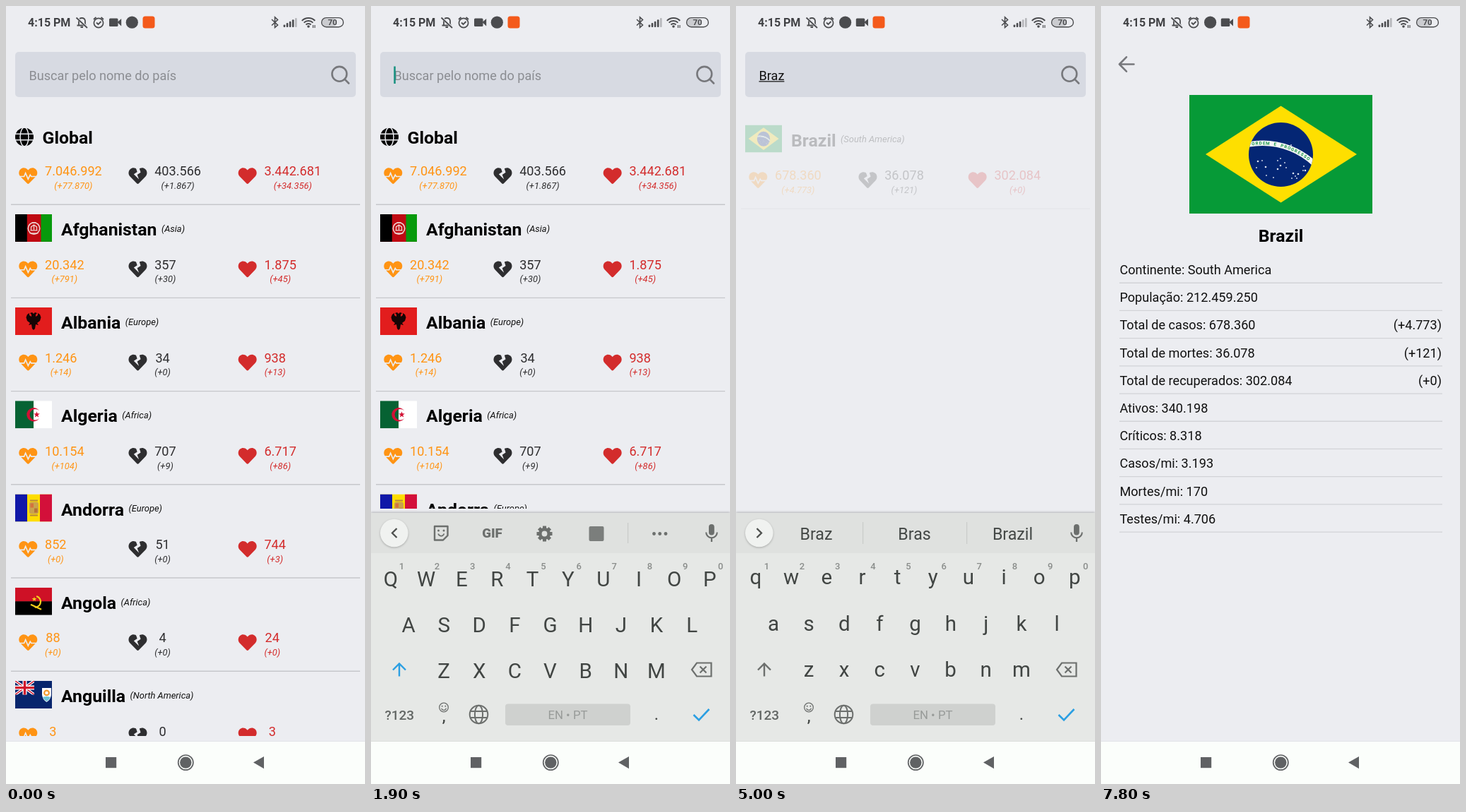
Write an HTML page with a canvas that moves like this. It is 508 px wide and 1102 px high and loops after 10 s.

```html
<!DOCTYPE html>
<html lang="pt">
<head>
<meta charset="utf-8">
<style>
html, body { margin: 0; width: 100%; height: 100%; overflow: hidden; background: #fbfefb; }
canvas { display: block; width: 508px; height: 1102px; }
</style>
</head>
<body>
<canvas id="stage"></canvas>
<script>
const W = 508, H = 1102, LOOP = 10000, NAV = 1042, KB = 718;
const BG = '#ecedf1', PAPER = '#fbfefb', GREY = '#77787c', KEY = '#414543', DIM = '#6c6f6d', BLUE = '#2b9fe2';
const canvas = document.getElementById('stage'), c = canvas.getContext('2d');
const dpr = window.devicePixelRatio || 1;
canvas.width = W * dpr;
canvas.height = H * dpr;

const clamp = v => Math.max(0, Math.min(1, v));
const span = (t, a, b) => clamp((t - a) / (b - a));
// last value whose start time has passed
const step = (t, pairs) => pairs.reduce((v, [at, next]) => t >= at ? next : v, pairs[0][1]);

function rect(x, y, w, h, color, r = 0) {
  c.fillStyle = color;
  c.beginPath();
  c.roundRect(x, y, w, h, r);
  c.fill();
}
function disc(x, y, r, color) {
  c.fillStyle = color;
  c.beginPath();
  c.arc(x, y, r, 0, 7);
  c.fill();
}
function ring(x, y, r, color, w, from = 0, to = 2 * Math.PI) {
  c.strokeStyle = color;
  c.lineWidth = w;
  c.beginPath();
  c.arc(x, y, r, from, to);
  c.stroke();
}
function fill(d, color) {
  c.fillStyle = color;
  c.fill(new Path2D(d));
}
function line(d, color, w) {
  c.strokeStyle = color;
  c.lineWidth = w;
  c.stroke(new Path2D(d));
}
function at(x, y, sx, sy, paint) {
  c.save();
  c.translate(x, y);
  c.scale(sx, sy);
  paint();
  c.restore();
}
function clipped(x, y, w, h, paint) {
  c.save();
  c.beginPath();
  c.rect(x, y, w, h);
  c.clip();
  paint();
  c.restore();
}
function shadow(blur, dy, paint) {
  c.save();
  c.shadowColor = 'rgba(0,0,0,.25)';
  c.shadowBlur = blur * dpr;
  c.shadowOffsetY = dy * dpr;
  paint();
  c.restore();
}
const font = (size, style = '') => { c.font = `${style} ${size}px Roboto, sans-serif`; };
function text(s, x, y, size, color, style = '', align = 'left') {
  font(size, style);
  c.fillStyle = color;
  c.textAlign = align;
  c.fillText(s, x, y);
  return c.measureText(s).width;
}
function star(x, y, r, color) {
  c.fillStyle = color;
  c.beginPath();
  for (let i = 0; i < 10; i++) {
    const a = i * Math.PI / 5 - Math.PI / 2, k = i % 2 ? r * .4 : r;
    c.lineTo(x + k * Math.cos(a), y + k * Math.sin(a));
  }
  c.fill();
}

// Flags are painted in a 52 x 39 box
function stripes([left, mid, right], a, b) {
  rect(0, 0, 52, 39, mid);
  rect(0, 0, a, 39, left);
  rect(b, 0, 52 - b, 39, right);
}
function ensign(shield) {
  rect(0, 0, 52, 39, '#07256d');
  clipped(0, 0, 27, 19.5, () => {
    line('M0 0L27 19.5M27 0L0 19.5', '#fff', 4);
    line('M0 0L27 19.5M27 0L0 19.5', '#cf142b', 1.4);
    line('M13.5 0V20M0 9.7H27', '#fff', 6);
    line('M13.5 0V20M0 9.7H27', '#cf142b', 3.4);
  });
  shield();
}
const SHIELD = 'M38 10H51V20Q50 27 44.5 30Q39 27 38 20z';
const SKY = [[222, 220], [228, 219], [220, 229], [233, 228], [250, 219], [254, 216], [254, 226], [260, 222], [262, 229],
  [250, 231], [234, 240], [244, 243], [272, 237], [275, 241], [270, 244], [279, 238], [286, 233], [287, 227], [289, 233],
  [277, 244], [269, 197]];
// painted in a 259 x 168 box
function brazil() {
  rect(0, 0, 259, 168, '#069a37');
  fill('M23 84L129.5 15.5L237 84L129.5 152.5z', '#fedf00');
  c.save();
  c.beginPath();
  c.arc(129.5, 84.5, 45.5, 0, 7);
  c.clip();
  rect(80, 30, 100, 110, '#042674');
  ring(103.6, 175, 106.8, '#f6f8f6', 7.5);
  SKY.forEach(([x, y], i) => disc(x - 125, y - 126, i % 3 ? .9 : 1.3, '#dfe5f2'));
  c.restore();
  [...'ORDEM E PROGRESSO'].forEach((ch, i) => {
    c.save();
    c.translate(103.6, 175);
    c.rotate(-.125 + i * .0485);
    text(ch, 0, -104.6, 6.2, '#159447', '700', 'center');
    c.restore();
  });
}
const flags = {
  Afghanistan() {
    stripes(['#000', '#bf0a12', '#079a0c'], 16.8, 36.5);
    ring(26.5, 20, 8.2, '#efd9d6', 1.6);
    line('M21.5 23H31.5M22.5 23V18L26.5 15L30.5 18V23M26.5 16V22M20.5 27H32.5M23.5 12H29.5', '#efd9d6', 1.2);
  },
  Albania() {
    rect(0, 0, 52, 39, '#e21d1d');
    for (const side of [1, -1])
      at(26, 0, side, 1, () => fill('M0 9L2 7 5 8 3 10V13L6 11V8L9 10 10.5 14 9 19 5 22 7 25 3 24 2 30 0 32z', '#160505'));
  },
  Algeria() {
    rect(0, 0, 26.5, 39, '#066233');
    rect(26, 0, 26, 39, '#fff');
    c.fillStyle = '#d21034';
    c.beginPath();
    c.arc(26, 19.5, 9.7, .6, -.6);
    c.arc(28.4, 19.5, 7.8, -.777, .777, true);
    c.fill();
    star(30.5, 19.5, 4.6, '#d21034');
  },
  Andorra() {
    stripes(['#1018a8', '#fedd00', '#d3103a'], 17, 35);
    rect(20, 11, 13, 17, '#c9a24d', 3);
    rect(21.5, 13, 4.5, 6, '#d4723c');
    rect(27, 20, 4.5, 6, '#b5713a');
    line('M21 9H32M21 30H32', '#b68a3e', 1.8);
  },
  Angola() {
    rect(0, 0, 52, 20, '#ce1126');
    rect(0, 19.5, 52, 19.5, '#000');
    ring(28, 20, 8, '#f6d21b', 2.2, -1.3, 1.6);
    line('M22 24L37 31', '#f6d21b', 2.2);
    star(27, 16.5, 3.5, '#f6d21b');
  },
  Anguilla() {
    ensign(() => {
      fill(SHIELD, '#fff');
      fill('M39 23Q44.5 21 50 23Q48 27 44.5 29Q41 27 39 23z', '#6cc4d8');
      ring(44.5, 17, 3.3, '#f39a2e', 2.2);
    });
  },
  Brazil() { at(0, 0, 52 / 259, 39 / 168, brazil); },
  'British Virgin Islands'() {
    ensign(() => {
      fill(SHIELD, '#2b8a3c');
      rect(43.3, 14, 2.6, 10, '#f3ead8');
      disc(44.6, 13, 1.4, '#8d5a35');
      line('M40 14V24M49 14V24', '#f5c92d', 1.5);
      line('M39 30Q44.5 34 50 30', '#e4c445', 2);
    });
  },
  Brunei() {
    rect(0, 0, 52, 39, '#f7e017');
    fill('M0 5L52 18.5V26.5L0 13.5z', '#fff');
    fill('M0 13.5L52 26.5V34L0 20.5z', '#000');
    ring(26, 20, 7, '#cf1126', 2.6, .1, 3.05);
    line('M26 8V29M21 12H31M21 31H31M19 16V23M33 16V23', '#cf1126', 2);
  },
  Gibraltar() {
    rect(0, 0, 52, 39, '#fff');
    rect(0, 26, 52, 13, '#da1420');
    fill('M13 26V10h2v2h2v-2h3v4h2V5h2v2h4V5h3v9h2v-4h2v2h2v-2h3V26z', '#d0141e');
    line('M18 26V21M26.5 26V20M35 26V21M26.5 9V12', '#4b0d10', 2.4);
    line('M26.5 27V35', '#f2c531', 1.6);
  }
};

// name, continent, then three pairs of total and change
const rows = `Global||7.046.992|77.870|403.566|1.867|3.442.681|34.356
Afghanistan|Asia|20.342|791|357|30|1.875|45
Albania|Europe|1.246|14|34|0|938|13
Algeria|Africa|10.154|104|707|9|6.717|86
Andorra|Europe|852|0|51|0|744|3
Angola|Africa|88|0|4|0|24|0
Anguilla|North America|3|0|0|0|3|0
Brazil|South America|678.360|4.773|36.078|121|302.084|0
British Virgin Islands|North America|8|0|1|0|7|0
Brunei|Asia|141|0|2|0|138|0
Gibraltar|Europe|176|1|0|0|164|9`.split('\n').map(r => r.split('|'));

const HEART = 'M462 63C407 16 326 24 276 76L256 96L236 76C186 24 104 16 50 63C-13 116 -16 212 40 270L233 470C246 483 266 483 279 470L472 270C528 212 525 116 462 63z';
const COLORS = ['#ff9414', '#2e2e30', '#d32c2c'];
function heart(kind, x, y) {
  at(x - 13, y - 13, 26 / 512, 26 / 512, () => {
    fill(HEART, COLORS[kind]);
    if (kind === 0) line('M0 272H144L184 176L256 345L314 226L342 272H512', BG, 32);
    if (kind === 1) fill('M205 40L240 144L144 208L288 352L240 224L336 160L298 40z', BG);
  });
}
function globe(x, y) {
  disc(x, y, 13, '#000');
  line(`M${x - 14} ${y - 4.3}h28m0 8.6h-28`, BG, 1.5);
  c.beginPath();
  c.ellipse(x, y, 6, 13.4, 0, 0, 7);
  c.stroke();
}
function row([name, place, ...nums], y) {
  if (place) {
    at(13, y, 1, 1, () => clipped(0, 0, 52, 39, flags[name]));
    const w = text(name, 78, y + 30, 24.8, '#000', '700');
    text(`(${place})`, 78 + w + 6.5, y + 24.8, 12.9, '#111', 'italic');
  } else {
    globe(26, y + 22.8);
    text(name, 51.5, y + 32.6, 24.8, '#000', '700');
  }
  for (let i = 0; i < 3; i++) {
    const total = nums[2 * i], diff = `(+${nums[2 * i + 1]})`, x = 55 + 155.2 * i;
    font(18.1);
    const a = c.measureText(total).width;
    font(12.9, 'italic');
    const mid = x + Math.max(a, c.measureText(diff).width) / 2;
    heart(i, 31.3 + 155.2 * i, y + 78);
    text(total, mid, y + 77.6, 18.1, COLORS[i], '', 'center');
    text(diff, mid, y + 96.2, 12.9, COLORS[i], 'italic', 'center');
  }
  rect(7, y + 117.8, 494, 1.4, '#c6c7cb');
}

function searchScreen(t, bottom) {
  const typed = step(t, [[0, ''], [2200, 'B'], [2600, 'Br'], [2900, 'Bra'], [3300, 'Braz'], [5600, '']]);
  const query = step(t, [[0, ''], [2700, 'br'], [3000, 'bra'], [3400, 'braz'], [5600, '']]);
  const cursor = step(t, [[0, 0], [1600, 1], [2100, 0], [2200, 1], [4000, 0], [4500, 1], [5000, 0]]);
  rect(13, 65, 482, 64, '#d7dae2', 5);
  let w = 0;
  if (typed) {
    w = text(typed, 32.5, 104.5, 18.1, '#111');
    rect(32.5, 106.3, w, 1.3, '#111');
  } else text('Buscar pelo nome do país', 32.5, 104.5, 18.1, '#8b8d92');
  if (cursor) rect(32.3 + w, 85.5, 2.5, 24.5, '#15907f');
  ring(471.8, 96.3, 10.4, GREY, 2.6);
  c.lineCap = 'round';
  line('M479.2 103.7L485 109.5', GREY, 2.6);
  c.lineCap = 'butt';
  clipped(0, 135, W, bottom - 142 + (bottom === KB ? 1 : -1), () => {
    const list = query ? rows.filter(r => r[0].toLowerCase().includes(query)) : rows.slice(0, 7);
    list.forEach((r, i) => row(r, (query ? 168.6 : 162.7) + i * 132.2));
    const veil = t < 5000 || t >= 5600 ? 0 : .79 * (1 - span(t, 5300, 5550));
    if (veil) rect(0, 160, W, 130, `rgba(236,237,241,${veil})`);
  });
}

const facts = ['Continente: South America', 'População: 212.459.250', 'Total de casos: 678.360|(+4.773)',
  'Total de mortes: 36.078|(+121)', 'Total de recuperados: 302.084|(+0)', 'Ativos: 340.198',
  'Críticos: 8.318', 'Casos/mi: 3.193', 'Mortes/mi: 170', 'Testes/mi: 4.706'];
function detailScreen(t) {
  c.lineCap = c.lineJoin = 'round';
  line('M46.5 82.5H26M36 72.3L26 82.5L36 92.7', GREY, 2.6);
  c.lineCap = 'butt';
  c.lineJoin = 'miter';
  if (t < 7100) return;
  if (t >= 7200) at(125, 126, 1, 1, brazil);
  text('Brazil', 254.5, 333.6, 24.8, '#000', '700', 'center');
  facts.forEach((f, i) => {
    const [left, right = ''] = f.split('|'), y = 380 + 39.2 * i;
    text(left, 26.4, y, 18.1, '#111');
    text(right, 482, y, 18.1, '#111', '', 'right');
    rect(26, y + 11.6, 457, 1.3, '#d2d3d7');
  });
}

const ROWS = [['qwertyuiop', 28, 821.8], ['asdfghjkl', 53, 887], ['zxcvbnm', 103, 952.2]];
function chevron(right) {
  shadow(3, 1, () => disc(32.8, 746.5, 19.8, '#f0f2f0'));
  line(right ? 'M29.5 740L36 746.5L29.5 753' : 'M36.5 740L30 746.5L36.5 753', '#4c4f4d', 2.3);
}
function toolbar() {
  c.lineJoin = 'round';
  line('M90 737H108.5V750L102 756.5H90z', DIM, 2.4);
  c.lineJoin = 'miter';
  disc(95.5, 743, 1.5, DIM);
  disc(103, 743, 1.5, DIM);
  ring(99.2, 746.5, 4.2, DIM, 1.8, .2, 2.9);
  text('GIF', 171.5, 753.2, 18.8, DIM, '900', 'center');
  for (let i = 0; i < 8; i++) {
    const a = i * Math.PI / 4, x = Math.cos(a), y = Math.sin(a);
    line(`M${245.5 + 6 * x} ${747.5 + 6 * y}L${245.5 + 11 * x} ${747.5 + 11 * y}`, DIM, 5);
  }
  ring(245.5, 747.5, 6.2, DIM, 4.6);
  rect(308.5, 737, 21, 21, '#7b7e7c', 2);
  rect(363, 732, 1.2, 29, '#c9cbc9');
  for (const x of [400.5, 408.7, 417]) disc(x, 747.5, 2.4, DIM);
}
function popup(ch, x, y) {
  shadow(6, 2, () => rect(x - 24, y - 130.5, 49, 145, '#fdfefd', 4));
  text(ch, x + .2, y - 80.5, 34, KEY, '', 'center');
  if (ch === 'a') for (let i = 0; i < 3; i++) rect(x + 7.5 + 4.2 * i, y - 66, 2.2, 2.2, KEY);
}
function keyboard(t) {
  const upper = t < 2200;
  const words = step(t, [[0, ''], [2200, 'B Be Br'], [2600, 'Br Be BR'], [2900, 'Bra Bras Brazil'], [3300, 'Braz Bras Brazil']]);
  shadow(3, -1, () => rect(0, KB, W, 57, '#dfe1df'));
  rect(0, 775, W, NAV - 775, '#e6e8e6');
  if (words) {
    words.split(' ').forEach((w, i) => text(w, 113.5 + 139 * i, 756, 23.2, '#444846', '', 'center'));
    rect(179, 731, 1.2, 31, '#c9cbc9');
    rect(326, 731, 1.2, 31, '#c9cbc9');
  } else toolbar();
  chevron(!!words);
  rect(478, 734, 7.8, 15.5, DIM, 4);
  ring(482, 745.5, 7.8, DIM, 2.1, 0, Math.PI);
  line('M482 753V759', DIM, 2.3);

  for (const [keys, x0, y] of ROWS) [...keys].forEach((k, i) => {
    const x = x0 + 50.15 * i;
    text(upper ? k.toUpperCase() : k, x, upper ? y : y - 2.4, 29.5, KEY, '', 'center');
    if (y < 850) text((i + 1) % 10, x + 15.4, 797.6, 13, '#8a8d8b', '500', 'center');
  });
  line('M40 949.5V932M31 940.5L40 931.5L49 940.5', upper ? BLUE : DIM, 2.4);
  line('M461 930.5H481.5V949.5H461L454 940z', DIM, 2.2);
  line('M465.5 935.5L474.5 944.5M474.5 935.5L465.5 944.5', DIM, 2.2);
  text('?123', 40.3, 1010.5, 19, '#626664', '500', 'center');
  ring(103, 993.5, 6.3, DIM, 1.3);
  ring(103, 994, 3.4, DIM, 1.3, .2, 2.9);
  disc(100.7, 991.8, 1, DIM);
  disc(105.3, 991.8, 1, DIM);
  text(',', 103.2, 1014, 22, KEY, '500', 'center');
  ring(152.5, 1003.5, 12.8, DIM, 2);
  c.beginPath();
  c.ellipse(152.5, 1003.5, 5.6, 12.8, 0, 0, 7);
  c.stroke();
  line('M141 999H164M141 1008H164', DIM, 2);
  rect(190, 988.5, 177, 30.5, '#cfd1cf', 4);
  text('EN • PT', 278.5, 1010, 16.8, '#989b99', '', 'center');
  text('.', 404, 1011, 24, KEY, '', 'center');
  line('M456.5 1004L464 1011.5L478.5 996', BLUE, 2.6);

  const pressed = step(t, [[0, ''], [2100, 'B'], [2200, ''], [2500, 'r'], [2600, ''], [2800, 'a'], [2900, ''], [3200, 'z'], [3300, '']]);
  for (const [keys, x0, y] of ROWS) {
    const i = pressed ? keys.indexOf(pressed.toLowerCase()) : -1;
    if (i >= 0) popup(pressed, x0 + 50.15 * i, y);
  }
}

function statusBar(t) {
  const ink = '#4b4c4f', pale = '#b5b6ba', swapped = t >= 4600;
  text('4:15 PM', 31, 29, 16, '#404144', '700');
  line('M100.5 27.5H114M103 27V21Q103.5 17 107.3 17Q111.5 17 112 21V27M105.5 30H109', ink, 1.8);
  line('M99.5 16L115.5 31', BG, 3.2);
  line('M99.5 16.5L115 31', ink, 1.8);
  ring(131, 24, 6.6, ink, 1.7);
  line('M124 19L127.5 16M138 19L134.5 16M128 23.5L130.5 26L134.5 22', ink, 1.8);
  const cam = swapped ? 178.3 : 154.5;
  rect(cam - 8.5, 17.5, 12.5, 11.5, ink, 1.5);
  fill(`M${cam + 3} 23L${cam + 8.7} 18V28.5z`, ink);
  disc(swapped ? 154.6 : 178.3, 23.2, 8.6, ink);
  rect(193.5, 14.5, 17, 17, '#f45a1b', 3.5);

  line('M376 19L384.5 27L380.5 30.5V15.8L384.5 19.5L376 27.5', ink, 1.6);
  for (let i = 0; i < 5; i++) {
    const h = 3.5 + i * 2.4, weak = i === 4 || i === 3 && t >= 5000 && t < 7800;
    rect(392.6 + i * 4.1, 30 - h, 2.6, h, weak ? pale : ink, 1);
  }
  for (const r of [5, 9, 13]) ring(428, 30, r, ink, 2, -2.36, -.78);
  disc(428, 29, 1.8, ink);
  line('M434.5 27V31M437 27V31', ink, 1.2);
  rect(447.5, 17.5, 20, 11.5, '#cbccd0', 5);
  c.strokeStyle = ink;
  c.lineWidth = 1.4;
  c.beginPath();
  c.roundRect(446.6, 16.6, 30.8, 13.2, 6.6);
  c.stroke();
  text('70', 462, 27.4, 11.5, ink, '700', 'center');
}
function navIcons() {
  const ink = '#606264';
  rect(141, 1064, 15.2, 15.2, ink);
  ring(254.3, 1071.6, 10.6, ink, 1.7);
  disc(254.3, 1071.6, 8.2, ink);
  fill('M350 1071.6L365 1063V1080.2z', ink);
}

// cubic-bezier(.2833, .99, .31833, .99)
function reveal(u) {
  let lo = 0, hi = 1;
  for (let i = 0; i < 24; i++) {
    const s = (lo + hi) / 2, r = 1 - s;
    if (.85 * s * r * r + .955 * s * s * r + s ** 3 < u) lo = s; else hi = s;
  }
  return 2.97 * lo * (1 - lo) + lo ** 3;
}

function draw(t) {
  c.setTransform(dpr, 0, 0, dpr, 0, 0);
  const bottom = t >= 1072 && t < 6200 ? KB : NAV;
  const p = reveal(span(t, 5954, 6379));
  const opening = t >= 5954, opened = t >= 6379;
  rect(0, 0, W, H, PAPER);
  rect(0, 0, W, bottom, BG);
  if (!opened) at(0, opening ? -.02 * KB * p : 0, 1, 1, () => searchScreen(t, bottom));
  if (opening) {
    if (!opened) rect(0, 0, W, bottom, `rgba(0,0,0,${.1 * clamp(p / .36)})`);
    const top = KB * (1 - p);
    clipped(0, top, W, bottom - top, () => {
      rect(0, 0, W, NAV, BG);
      at(0, top * .041, 1, 1, () => detailScreen(t));
    });
  }
  if (t >= 1072 && t < 6350) {
    const rise = 384 * (1 - span(t, 1072, 1500)) ** 2.8, fall = 324 * span(t, 6200, 6350);
    clipped(0, 0, W, t < 1500 ? H : NAV, () => at(0, rise + fall, 1, 1, () => keyboard(t)));
  }
  rect(0, NAV - 1, W, 1, 'rgba(0,0,0,.04)');
  statusBar(t);
  navIcons();
}

function frame() {
  draw(performance.now() % LOOP);
  requestAnimationFrame(frame);
}
frame();
</script>
</body>
</html>
```
